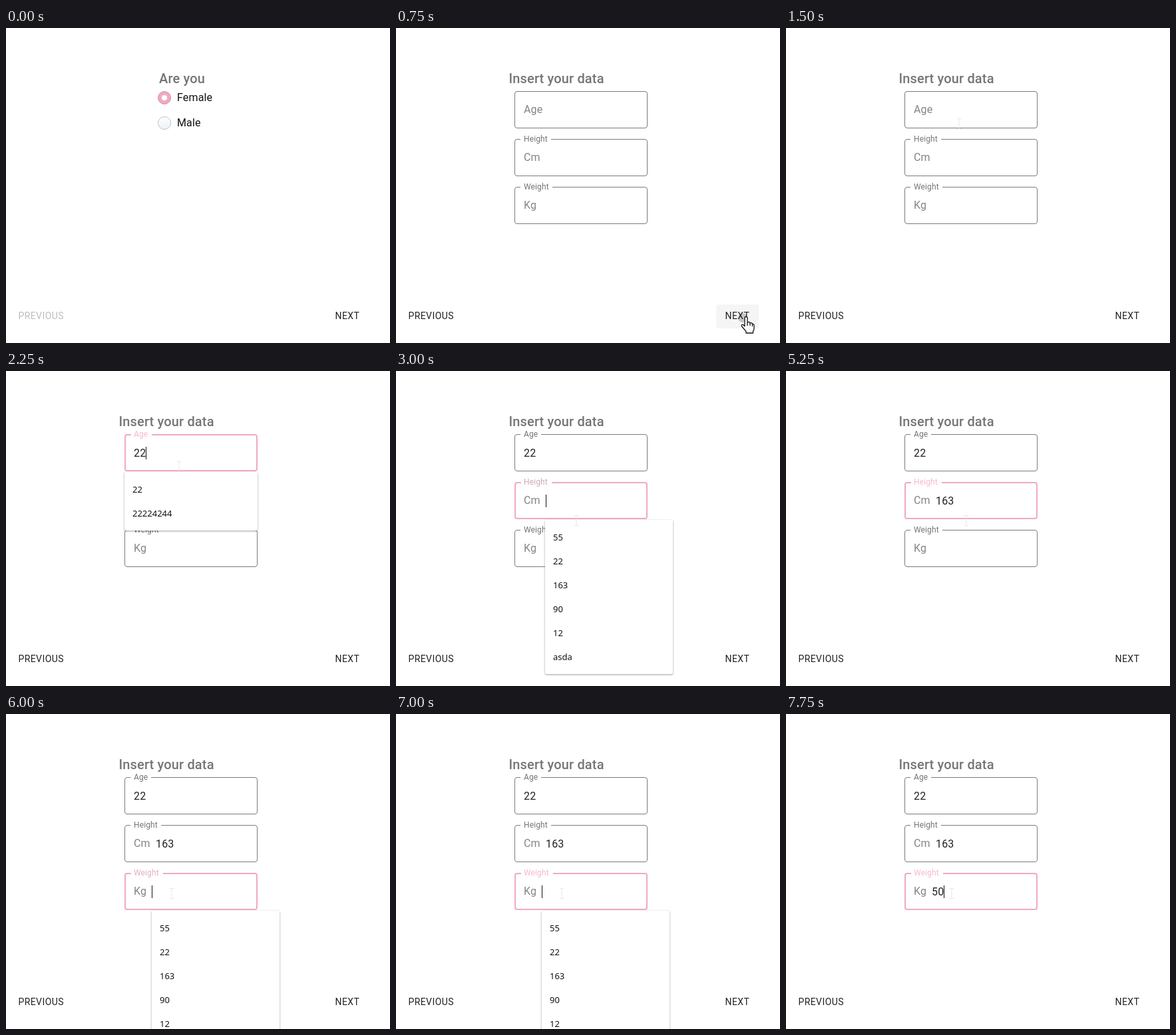
Recreate the animation shown at these times as an HTML page. Size 577 px wide and 474 px high, loop 8000 ms.

```html
<!DOCTYPE html>
<html lang="en">
<head>
<meta charset="utf-8">
<title>Form steps</title>
<style>
  html, body { margin: 0; width: 577px; height: 474px; overflow: hidden; background: #fff; }
  svg { display: block; font-family: Roboto, Arial, sans-serif; }
  text { white-space: pre; }
  .title { font-size: 20px; font-weight: 500; letter-spacing: .15px; fill: #757575; }
  .body { font-size: 16px; letter-spacing: .15px; fill: #212121; }
  .hint { fill: #858585; }
  .label { font-size: 12px; letter-spacing: .11px; }
  .button { font-size: 14px; letter-spacing: .4px; fill: #212121; }
  .item { font: 500 13px "Noto Sans", "Open Sans", sans-serif; fill: #111; }
  .popup { fill: #fff; filter: drop-shadow(0 1px 1.5px rgba(0, 0, 0, .38)); }
</style>
</head>
<body>
<svg id="stage" width="577" height="474" viewBox="0 0 577 474"></svg>
<script>
const LOOP = 8000;
const GREY = '#7b7b7b', PINK = '#f0aabe', BLUSH = '#f6b9c9', MIXED = '#c9abb3';
const HISTORY = ['55', '22', '163', '90', '12', 'asda'];
const AGES = ['22', '22224244', '55', '163', '90', '12'];

const FIELDS = [
  { name: 'Age', unit: '', y: 95, notch: 31, textX: 192, listX: 178, listY: 152, listW: 200 },
  { name: 'Height', unit: 'Cm', y: 167, notch: 46, textX: 225, listX: 224, listY: 224, listW: 192 },
  { name: 'Weight', unit: 'Kg', y: 239, notch: 48, textX: 219, listX: 219, listY: 296, listW: 192 }
];

// Each step changes only the listed parts of the state.
const START = { page: 0, hover: 0, ripple: 0, focus: -1, tint: BLUSH, caret: 0,
                list: [], values: ['', '', ''], pointer: null };
const STEPS = [
  [0, {}],
  [250, { hover: 1, pointer: ['hand', 519, 434] }],
  [500, { page: 1, ripple: .28 }],
  [750, { ripple: .2 }],
  [1000, { ripple: 0 }],
  [1250, { hover: 0, pointer: ['arrow', 497, 369] }],
  [1500, { pointer: ['beam', 260, 144] }],
  [1750, { focus: 0, caret: 1, list: AGES }],
  [2000, { values: ['2', '', ''], list: AGES.slice(0, 2) }],
  [2250, { values: ['22', '', ''] }],
  [2500, { caret: 0 }],
  [2750, { caret: 1, list: [], pointer: ['beam', 271, 210] }],
  [3000, { focus: 1, tint: MIXED, list: HISTORY, pointer: ['beam', 271, 225] }],
  [3250, { tint: BLUSH }],
  [3500, { caret: 0 }],
  [4000, { caret: 1, values: ['22', '1', ''], list: ['163', '12'] }],
  [4250, { values: ['22', '16', ''], list: ['163'] }],
  [4750, { values: ['22', '163', ''], list: [] }],
  [5250, { caret: 0 }],
  [5500, { pointer: ['beam', 262, 248] }],
  [5750, { caret: 1, pointer: ['beam', 249, 270] }],
  [6000, { focus: 2, tint: '#e3afbd', list: HISTORY }],
  [6250, { tint: BLUSH }],
  [6500, { caret: 0 }],
  [7000, { caret: 1 }],
  [7500, { values: ['22', '163', '5'], list: ['55'] }],
  [7750, { values: ['22', '163', '50'], list: [] }]
];

const text = (x, y, str, cls, fill) =>
  `<text x="${x}" y="${y}" class="${cls}"${fill ? ` style="fill:${fill}"` : ''}>${str}</text>`;

const rect = (x, y, w, h, attrs) =>
  `<rect x="${x}" y="${y}" width="${w}" height="${h}" ${attrs}/>`;

function radio(y, name, on) {
  const ring = `<circle cx="238" cy="${y}" r="9.5" fill="${on ? '#efa9c3' : 'url(#pale)'}" stroke="${on ? '#d58eaa' : '#b9c3cb'}"/>`;
  const dot = on ? `<circle cx="238" cy="${y}" r="4" fill="#fff"/>` : '';
  return ring + dot + text(257, y + 5, name, 'body', '#111');
}

function field(f, i, s) {
  const active = s.focus === i, value = s.values[i], raised = active || value || f.unit;
  const w = active ? 2 : 1, mid = f.y + 28;
  let out = rect(178 + w / 2, f.y + w / 2, 200 - w, 56 - w,
    `rx="${4 - w / 2}" fill="none" stroke="${active ? PINK : GREY}" stroke-width="${w}"`);
  if (raised) {
    out += rect(186 + w, f.y - 1, f.notch, 4, 'fill="#fff"');
    out += text(192, f.y + 4, f.name, 'label', active ? s.tint : '#757575');
  } else {
    out += text(192, mid + 5, f.name, 'body hint');
  }
  if (f.unit) out += text(192, mid + 5, f.unit, 'body hint');
  out += text(f.textX, mid + 6, value, 'body');
  if (active && s.caret) {
    out += rect(f.textX + Math.round(value.length * 9.1), mid - 9, 1, 19, 'fill="#111"');
  }
  return out;
}

function popup(f, items) {
  if (!items.length) return '';
  return rect(f.listX, f.listY, f.listW, items.length * 36 + 16, 'rx="2" class="popup"') +
    items.map((item, i) => text(f.listX + 12, f.listY + 31 + i * 36, item, 'item')).join('');
}

const SHAPES = {
  hand: `<path d="M6 15V2.5a2 2 0 0 1 4 0V9q3-1.500 4 1 3-1 3.500 1.500 2.500-.5 2.500 2v5q0 2-1.500 3.500V25H8v-2.500L2 15.500q-1.500-2 0-3t4 2.500M10 9v5M14 10v4M17.500 11.500V15"
    transform="translate(-1 0)" fill="#fff" stroke="#111" stroke-width="1.300" stroke-linejoin="round"/>`,
  arrow: '<path d="M.5.5v16l4-3.500 2.500 5.500 2.500-1L7 12h5z" fill="#fff" stroke="#111"/>',
  beam: '<path d="M-3.500-7.500h3l.5.5.5-.5h3M0-7V7M-3.500 7.500h3L0 7l.5.5h3" fill="none" stroke="#e6e6e6"/>'
};

function draw(s) {
  let out = `<defs><linearGradient id="pale" x2="0" y2="1">
    <stop stop-color="#fff"/><stop offset="1" stop-color="#edf2f5"/></linearGradient></defs>`;
  if (s.hover) out += rect(481, 416, 64, 36, 'rx="4" fill="#f5f5f5"');
  if (s.ripple) out += `<circle cx="521" cy="436" r="7" fill="#000" opacity="${s.ripple}"/>`;
  out += text(18.5, 438, 'PREVIOUS', 'button', s.page ? '' : '#bdbdbd');
  out += text(494.5, 438, 'NEXT', 'button');
  if (s.page) {
    out += text(169.500, 83, 'Insert your data', 'title');
    out += FIELDS.map((f, i) => field(f, i, s)).join('');
    if (s.focus >= 0) out += popup(FIELDS[s.focus], s.list);
  } else {
    out += text(230, 83, 'Are you', 'title') + radio(105, 'Female', true) + radio(143, 'Male', false);
  }
  if (s.pointer) {
    const [kind, x, y] = s.pointer;
    out += `<g transform="translate(${x} ${y})">${SHAPES[kind]}</g>`;
  }
  return out;
}

const stage = document.getElementById('stage');
const begin = performance.now();
let shown = -1;

function tick() {
  const t = (performance.now() - begin) % LOOP;
  const past = STEPS.filter(([at]) => at <= t);
  if (past.length !== shown) {
    shown = past.length;
    stage.innerHTML = draw(Object.assign({}, START, ...past.map(step => step[1])));
  }
  requestAnimationFrame(tick);
}
tick();
</script>
</body>
</html>
```
